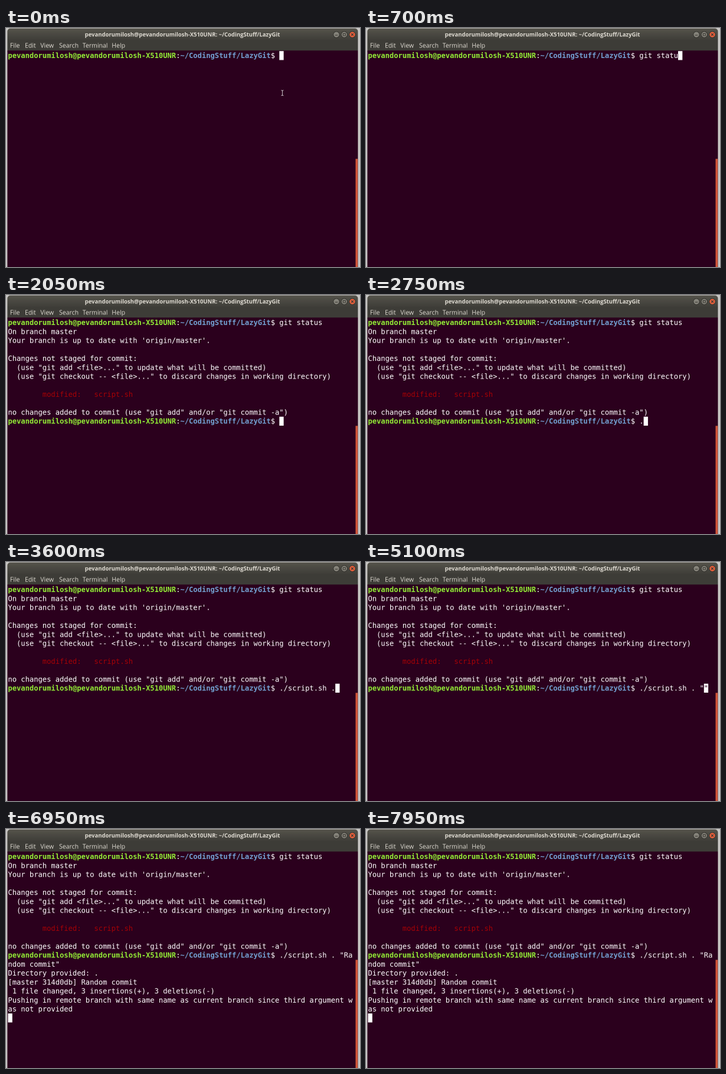
An HTML page with a canvas for the animation above (8 s loop, 600 px wide and 406 px high).

```html
<!DOCTYPE html>
<html lang="en">
<head>
<meta charset="utf-8">
<title>Terminal session</title>
<style>
  html, body { margin: 0; width: 100%; height: 100%; overflow: hidden; background: #c9c7c5; }
  canvas { display: block; width: 600px; height: 406px; }
</style>
</head>
<body>
<canvas></canvas>
<script>
const LOOP = 8000, COLS = 80;
const CELL_W = 7.3, CELL_H = 15.23, LEFT = 3.4, TOP = 39.2;
const BG = '#2b001d', WHITE = '#ffffff', GREEN = '#92ec36', BLUE = '#729fcf', RED = '#a60006';
const MONO = '12.13px "DejaVu Sans Mono", monospace';
const USER = 'pevandorumilosh', HOST = USER + '-X510UNR', FOLDER = '~/CodingStuff/LazyGit';

// Draw at double size so text rows can sit between whole pixels
const canvas = document.querySelector('canvas');
const ctx = canvas.getContext('2d');
const scale = 2 * (window.devicePixelRatio || 1);
canvas.width = 600 * scale;
canvas.height = 406 * scale;
ctx.scale(scale, scale);

// One entry per keystroke: [time, text before the cursor, text after it]
const typed = (word, start, step, prefix = '', suffix = '') =>
  [...word].map((_, i) => [start + i * step, prefix + word.slice(0, i + 1), suffix]);

const statusKeys = typed('git status', 130, 70);
const STATUS_ENTER = 900;
const scriptKeys = [
  ...typed('./s', 2700, 110),
  [3100, './script.sh ', ''],
  [3500, './script.sh .', ''],
  [4000, './script.sh . ', ''],
  [4450, './script.sh . "', ''],
  [4600, './script.sh . ""', ''],
  [4800, './script.sh . "', '"'],
  ...typed('Ram', 5300, 170, './script.sh . "', '"'),
  [5960, './script.sh . "Ra', '"'],
  ...typed('ndom commit', 6010, 62, './script.sh . "Ra', '"'),
];
const SCRIPT_ENTER = 6740;

const statusOutput = `On branch master
Your branch is up to date with 'origin/master'.

Changes not staged for commit:
  (use "git add <file>..." to update what will be committed)
  (use "git checkout -- <file>..." to discard changes in working directory)

`;
const scriptOutput = [
  [6770, 'Directory provided: .\n'],
  [6900, '[master 314d0db] Random commit\n 1 file changed, 3 insertions(+), 3 deletions(-)\n'],
  [6950, 'Pushing in remote branch with same name as current branch since third argument was not provided\n'],
];

const latest = (keys, t) => keys.findLast(key => key[0] <= t) || [0, '', ''];

function drawTerminal(t) {
  let col = 0, row = 0;

  function print(text, color = WHITE, bold = false) {
    ctx.font = (bold ? 'bold ' : '') + MONO;
    ctx.fillStyle = color;
    for (const char of text) {
      if (char === '\n') { col = 0; row++; continue; }
      if (col === COLS) { col = 0; row++; }
      ctx.fillText(char, LEFT + col * CELL_W, TOP + row * CELL_H + 11.9);
      col++;
    }
  }

  function prompt() {
    print(`${USER}@${HOST}`, GREEN, true);
    print(':');
    print(FOLDER, BLUE, true);
    print('$ ');
  }

  function cursor(after = '') {
    if (col === COLS) { col = 0; row++; }
    ctx.fillStyle = WHITE;
    ctx.fillRect(LEFT + col * CELL_W, TOP + row * CELL_H, CELL_W, CELL_H);
    print(after, BG);
  }

  prompt();
  print(latest(statusKeys, t)[1]);
  if (t < STATUS_ENTER) return cursor();

  print('\n' + statusOutput);
  print('        modified:   script.sh\n\n', RED);
  print('no changes added to commit (use "git add" and/or "git commit -a")\n');
  prompt();
  const [, before, after] = latest(scriptKeys, t);
  print(before);
  if (t < SCRIPT_ENTER) return cursor(after);

  print(after + '\n');
  for (const [time, text] of scriptOutput) if (t >= time) print(text);
  cursor();
}

function strokePath(path, color, width = 1) {
  ctx.strokeStyle = color;
  ctx.lineWidth = width;
  ctx.stroke(new Path2D(path));
}

function drawButton(x, fill, icon) {
  ctx.beginPath();
  ctx.arc(x, 11.2, 5.1, 0, Math.PI * 2);
  ctx.fillStyle = fill;
  ctx.fill();
  ctx.strokeStyle = '#302f2b';
  ctx.lineWidth = 0.8;
  ctx.stroke();
  strokePath(`M${x} 11.2${icon}`, '#3a3833', 1.1);
}

function drawWindow() {
  ctx.fillStyle = '#c9c7c5';
  ctx.fillRect(0, 0, 600, 406);

  const bar = ctx.createLinearGradient(0, 1, 0, 22);
  bar.addColorStop(0, '#55534b');
  bar.addColorStop(1, '#3d3c37');
  ctx.fillStyle = bar;
  ctx.beginPath();
  ctx.roundRect(2.3, 0.8, 594.2, 40, [5, 5, 0, 0]);
  ctx.fill();

  ctx.fillStyle = BG;
  ctx.fillRect(2.3, 38.3, 594.2, 368);
  ctx.fillStyle = '#d2583a';
  ctx.fillRect(592.5, 222.3, 3.6, 184);

  ctx.fillStyle = '#dfdbd2';
  ctx.textAlign = 'center';
  ctx.font = 'bold 9.5px "Open Sans", sans-serif';
  ctx.fillText(`${USER}@${HOST}: ${FOLDER}`, 299, 14.4);
  ctx.textAlign = 'left';
  ctx.font = '10.5px "Open Sans", sans-serif';
  const menu = { File: 6.8, Edit: 32, View: 58.3, Search: 90, Terminal: 129.8, Help: 179.3 };
  for (const [label, x] of Object.entries(menu)) ctx.fillText(label, x, 33.6);

  drawButton(560, '#85837a', 'm-2.3 1h4.6');
  drawButton(573.3, '#85837a', 'm-2 -1.8h4v3.6h-4z');
  drawButton(587, '#e8613c', 'm-2 -2l4 4m0 -4l-4 4');
}

function drawPointer() {
  const beam = 'M466.4 105.8q2 0 2 1.5v6q0 1.5 -2 1.5m4 -9q-2 0 -2 1.5m0 6q0 1.5 2 1.5';
  strokePath(beam, '#d8d0d5', 0.9);
}

function frame(now) {
  const t = now % LOOP;
  drawWindow();
  drawTerminal(t);
  if (t < statusKeys[0][0]) drawPointer();
  requestAnimationFrame(frame);
}
requestAnimationFrame(frame);
</script>
</body>
</html>
```
